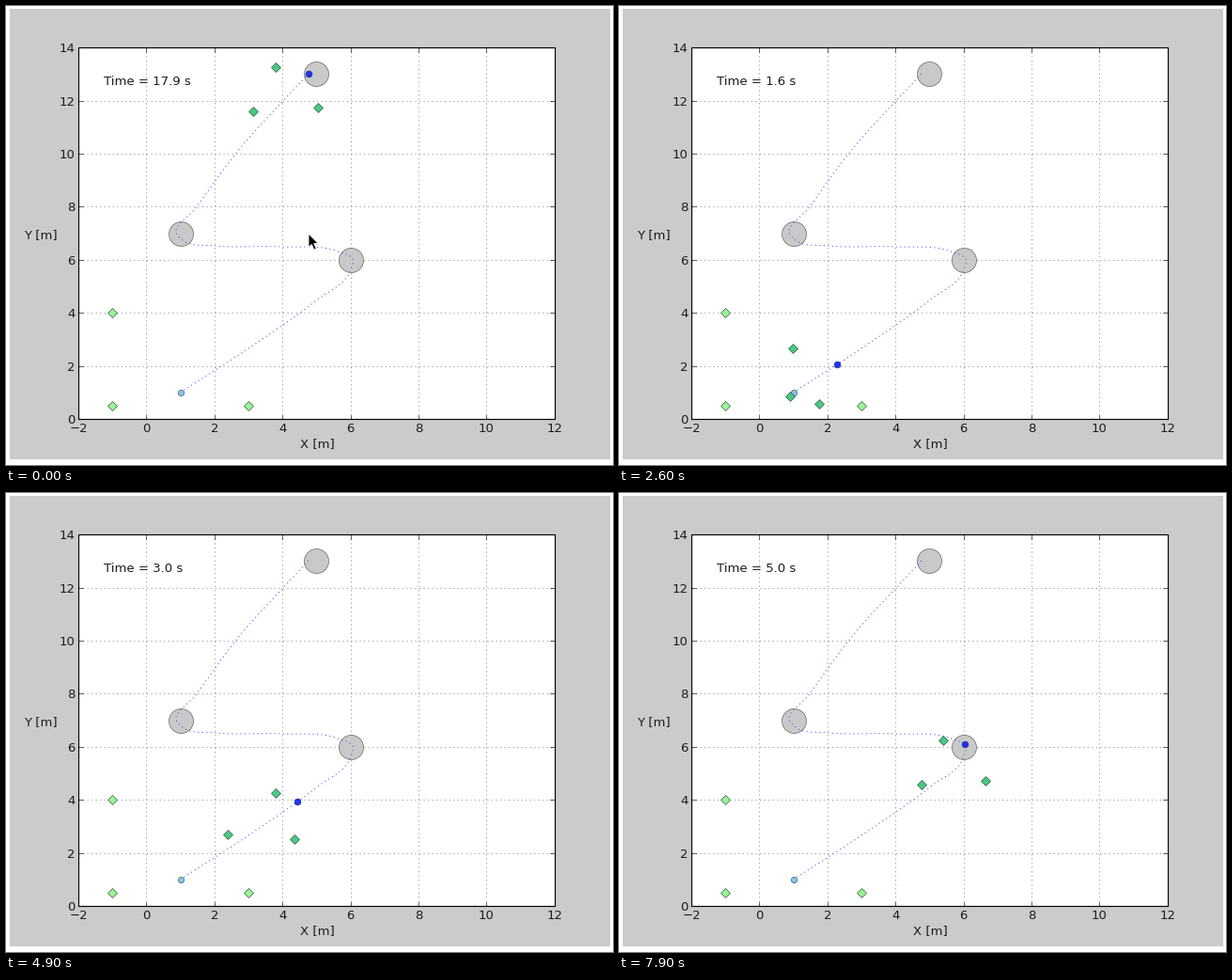
Write a matplotlib script that moves like this. It is 646 px wide and 488 px high and loops after 8 s.

```python
import numpy as np
import matplotlib.pyplot as plt
from matplotlib.animation import FuncAnimation
from matplotlib.patches import Polygon, Rectangle

W, H, DPI = 646, 488, 64
PX = 72 / DPI              # points per pixel
FRAMES, STEP = 80, 100
RESTART = 400              # ms at which the run starts again
LEFT, BOTTOM, DX, DY = 77, 439, 36.2, 28.2
INK, GRID, EDGE = "#1c1c1c", "#505050", "#2f4a38"

plt.rcParams.update({"font.family": "DejaVu Sans", "font.size": 13.3 * PX,
                     "text.color": INK, "lines.scale_dashes": False})


def at(x, y):
    """Metres to stage pixels."""
    return LEFT + (x + 2) * DX, BOTTOM - y * DY


def smooth_curve(pts, count=600):
    """Cubic through pts, with the distance travelled at each sample."""
    keys = np.append(0, np.cumsum(np.hypot(*np.diff(pts, axis=0).T)))
    slopes = np.gradient(pts, keys, axis=0)
    s = np.linspace(0, keys[-1], count)
    i = np.clip(np.searchsorted(keys, s, side="right") - 1, 0, len(keys) - 2)
    h = (keys[i + 1] - keys[i])[:, None]
    u = (s - keys[i])[:, None] / h
    ease = u * u * (3 - 2 * u)
    curve = (pts[i] * (1 - ease) + pts[i + 1] * ease
             + u * (1 - u) * h * ((1 - u) * slopes[i] - u * slopes[i + 1]))
    arc = np.append(0, np.cumsum(np.hypot(*np.diff(curve, axis=0).T)))
    return curve, arc


fig = plt.figure(figsize=(W / DPI, H / DPI), dpi=DPI, facecolor="#fefefe")
ax = fig.add_axes([0, 0, 1, 1])
ax.set_xlim(0, W)
ax.set_ylim(H, 0)
ax.axis("off")
ax.add_patch(Rectangle((4, 3), 639, 479, fc="#cbcbcb", lw=0))


def line(xs, ys, color="black", width=0.6, z=2, dotted=False):
    style = (0, (1.13 * PX, 3.4 * PX)) if dotted else "-"
    ax.plot(xs, ys, color=color, lw=width * PX, zorder=z, linestyle=style)


def marker(pos, shape, size, color, z, edge=EDGE):
    return ax.plot([pos[0]], [pos[1]], shape, ms=size * PX, mfc=color,
                   mec=edge, mew=0.6 * PX, zorder=z)[0]


# plot area, grid, ticks and labels
x0, y0 = at(-2, 0)
x1, y1 = at(12, 14)
TICK = 4.5
ax.add_patch(Rectangle((x0, y1), x1 - x0, y0 - y1, fc="white", lw=0, zorder=1))
for v in range(-2, 13, 2):
    x = at(v, 0)[0]
    if -2 < v < 12:
        line([x, x], [y0, y1], GRID, dotted=True)
        line([x, x], [y0, y0 - TICK])
        line([x, x], [y1, y1 + TICK])
    ax.text(x, 453, str(v).replace("-", "\u2212"), ha="center", va="baseline")
for v in range(0, 15, 2):
    y = at(0, v)[1]
    if 0 < v < 14:
        line([x0, x1], [y, y], GRID, dotted=True)
        line([x0, x0 + TICK], [y, y])
        line([x1, x1 - TICK], [y, y])
    ax.text(73.5, y + 5, str(v), ha="right", va="baseline")
line([x0, x1, x1, x0, x0], [y0, y0, y1, y1, y0], width=1.13, z=3)
ax.text(331.5, 469, "X [m]", ha="center", va="baseline")
ax.text(37, 247, "Y [m]", ha="center", va="baseline")
clock = ax.text(103.5, 84, "", va="baseline", zorder=5)

# waypoints, start marks and the planned route
for goal in [(1, 7), (6, 6), (5, 13)]:
    marker(at(*goal), "o", 26, "#c9c9c9", 4, edge="#505050")
homes = [(-1, 0.5), (3, 0.5), (-1, 4)]
marker(at(1, 1), "o", 6.3, "#87c5f0", 6)
for home in homes:
    marker(at(*home), "D", 6.8, "#98f694", 6)

stops = [(1, 1), (2.99, 2.65), (5, 4.47), (5.97, 5.52), (6.07, 6.02),
         (5.61, 6.32), (4, 6.49), (1.99, 6.53), (1.11, 6.7), (0.89, 6.97),
         (1.47, 7.98), (2.55, 9.88), (4.77, 13.02)]
route, arc = smooth_curve(np.array([at(*p) for p in stops]))
line(*route.T, color="#4040e8", width=0.9, z=5, dotted=True)

# follower places relative to the leader, in pixels
start = np.array([at(*p) for p in homes]) - at(1, 1)
gather = np.array([(-49.5, 34), (-18.5, 41.5), (-46.5, -17.5)])
cruise = np.array([(-74, 35), (-3, 40), (-23, -9)])
turned = np.array([(-46, 43), (22.5, 39), (-22.5, -4.5)])
parked = turned + (-13, -2.5)
pose_times = [0, 1.6, 2.6, 3.6, 5.0]
poses = np.array([start, gather, cruise, cruise, turned])


def on_route(dist):
    return np.array([np.interp(dist, arc, axis) for axis in route.T])


def leader_at(t):
    """Speeds up from the start and brakes at the first waypoint."""
    u = min(t / 5.15, 1)
    return on_route(239 * u * u * (3 - 2 * u))


def formation_at(t):
    i = min(np.searchsorted(pose_times, t, side="right"), len(poses) - 1) - 1
    u = (t - pose_times[i]) / (pose_times[i + 1] - pose_times[i])
    return poses[i] + (poses[i + 1] - poses[i]) * u


leader = marker((0, 0), "o", 6.8, "#1f35e6", 9, edge="#1a249c")
followers = [marker((0, 0), "D", 6.8, "#48c985", 8) for _ in homes]

arrow = np.array([(0, 0), (0, 14.5), (3.3, 11.6), (5.8, 17.2), (8.3, 16),
                  (5.8, 10.6), (10.2, 10.4)])
cursor = ax.add_patch(Polygon(arrow + (322, 242), fc="black", ec="white",
                              lw=0.9 * PX, zorder=10))


def draw(n):
    ms = n * STEP
    running = ms >= RESTART
    if running:
        # playback speed drifts a little
        t = np.interp(ms, [RESTART, 1200, 2600, 6500, 7900], [0, 0.5, 1.6, 4, 5])
        head, offsets = leader_at(t), formation_at(t)
    else:
        t, head, offsets = 17.9, on_route(arc[-1]), parked
    clock.set_text(f"Time = {t:.1f} s")
    cursor.set_visible(not running)
    leader.set_data([head[0]], [head[1]])
    for bot, (x, y) in zip(followers, head + offsets):
        bot.set_data([x], [y])
    return [clock, cursor, leader, *followers]


anim = FuncAnimation(fig, draw, frames=FRAMES, interval=STEP, repeat=True,
                     repeat_delay=0, blit=False)
plt.show()
```
